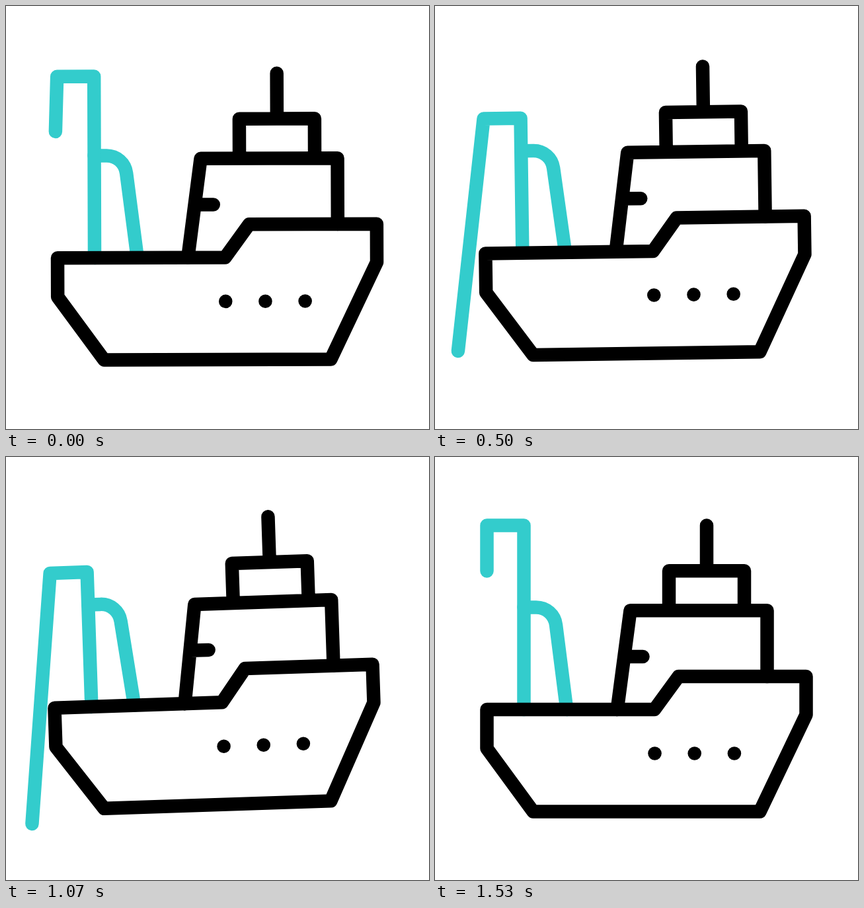
Write an HTML page with a canvas that moves like this. It is 640 px wide and 640 px high and loops after 1.67 s.

```html
<!DOCTYPE html>
<html lang="en">
<head>
<meta charset="utf-8">
<title>Fishing boat</title>
<style>
  html, body { margin: 0; width: 100%; height: 100%; overflow: hidden; background: #fff; }
  canvas { display: block; width: 100vw; height: 100vh; }
</style>
</head>
<body>
<canvas id="stage" width="640" height="640"></canvas>
<script>
const ctx = document.getElementById("stage").getContext("2d");
const LOOP = 1670;
const TEAL = "#33cccc";
const PIVOT = { x: 320, y: 536.5 };
const STOWED = { x: 78.5, y: 172.5 };
const LOWERED = { x: 38.6, y: 556 };

const HULL = new Path2D("M78.5 382H332L368.5 332H561.5V390L491.5 536.5H148.5L78.5 441Z");
const CABIN = new Path2D(
  "M275.7 382L295.5 232.3H502.5V332 M354 232V172.3H468V232 M411 172V103.5 M287 302H314.5");
const BRACE = new Path2D("M134.5 227.5H153C168.5 227.5 181 238.7 183 254L199.3 382");

const clamp = v => Math.min(1, Math.max(0, v));
const lerp = (a, b, s) => a + (b - a) * s;

// Smooth progress from 0 to 1 between two steps; the picture runs at 30 steps per second.
function swing(step, from, to) {
  const u = clamp((step - from) / (to - from));
  return u * u * (3 - 2 * u);
}

// The crane and the heave share four evenly spaced beats; the tilt trails behind them.
const beat = (step, n) => swing(step, -1.6 + 11.26 * n, 9.66 + 11.26 * n);

function poseAt(step) {
  const [drop, settle, sink, raise] = [0, 1, 2, 3].map(n => beat(step, n));
  const out = drop - raise;
  const reach = 0.869 * drop + 0.131 * settle - raise;
  return {
    heave: -28.4 * drop + 38 * settle - 20 * sink + 10.4 * raise,
    tilt: -3.4 * swing(step, -1.6, 10) + 7.4 * swing(step, 10, 22.5)
      - 6 * swing(step, 22.5, 32.7) + 2 * swing(step, 32.7, 46),
    mastTop: 103.5 + 74.5 * out,
    ropeX: lerp(STOWED.x, LOWERED.x, reach) - 12 * (drop - settle),
    ropeY: lerp(STOWED.y, LOWERED.y, reach),
  };
}

function drawCrane({ mastTop, ropeX, ropeY }) {
  ctx.strokeStyle = TEAL;
  ctx.stroke(BRACE);
  ctx.beginPath();
  ctx.moveTo(134.5, 382);
  ctx.lineTo(134.5, mastTop);
  ctx.lineTo(STOWED.x, mastTop);
  ctx.lineTo(ropeX, ropeY);
  ctx.stroke();
}

function drawShip() {
  ctx.strokeStyle = ctx.fillStyle = "#000";
  ctx.stroke(CABIN);
  ctx.stroke(HULL);
  for (let i = 0; i < 3; i++) {
    ctx.beginPath();
    ctx.arc(332.5 + 60.2 * i, 448.5, 10.3, 0, Math.PI * 2);
    ctx.fill();
  }
}

function draw(time) {
  // Steps start on multiples of 10 ms.
  const step = Math.floor((Math.floor(time / 10) + 0.5) * 0.3);
  const pose = poseAt(step);
  ctx.fillStyle = "#fff";
  ctx.fillRect(0, 0, 640, 640);
  ctx.save();
  ctx.lineWidth = 20.5;
  ctx.lineCap = ctx.lineJoin = "round";
  ctx.translate(PIVOT.x, PIVOT.y + pose.heave);
  ctx.rotate(pose.tilt * Math.PI / 180);
  ctx.translate(-PIVOT.x, -PIVOT.y);
  drawCrane(pose);
  drawShip();
  ctx.restore();
}

let start;
function tick(now) {
  start ??= now;
  draw((now - start) % LOOP);
  requestAnimationFrame(tick);
}
draw(0);
requestAnimationFrame(tick);
</script>
</body>
</html>
```
